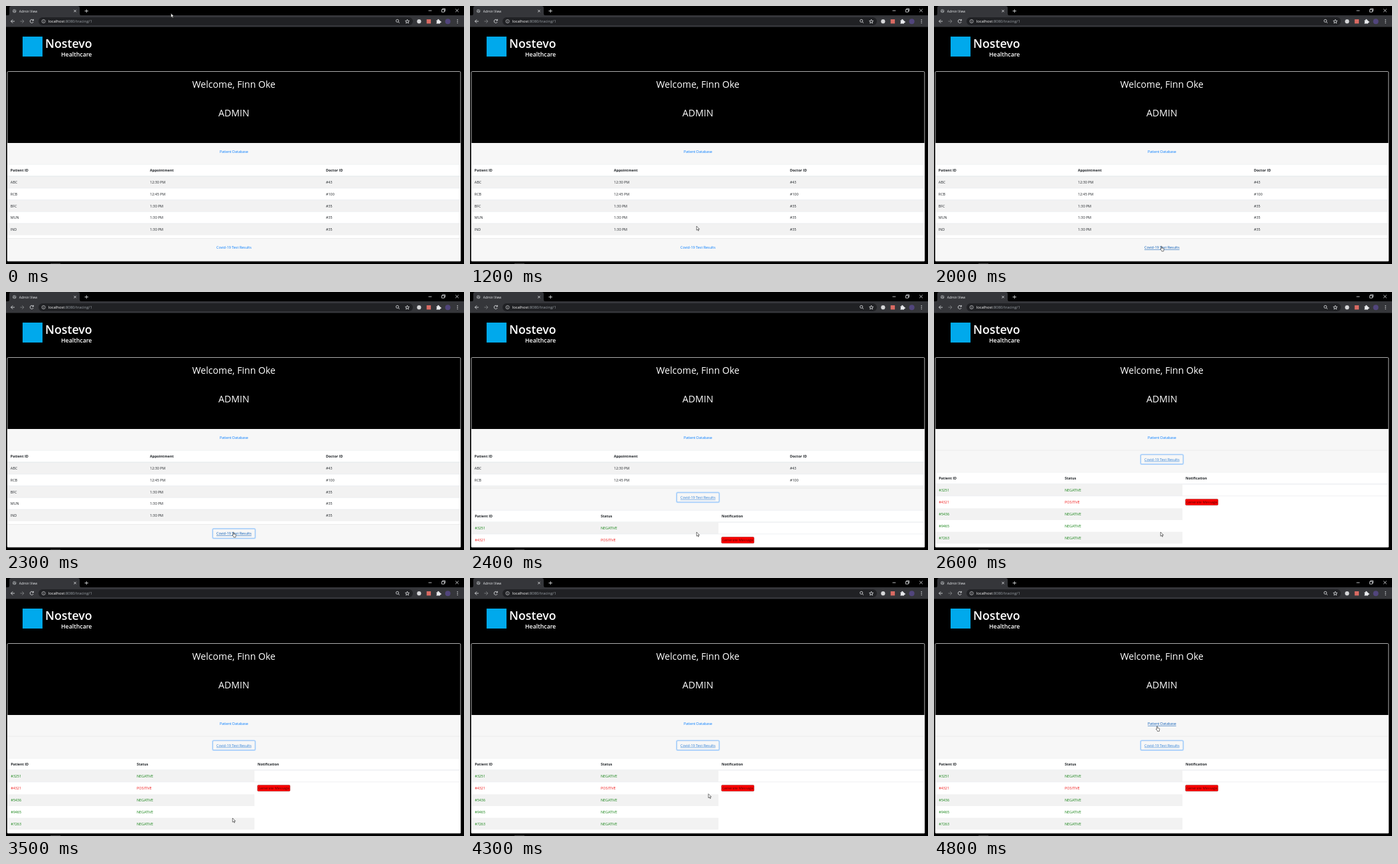
Animation of 690 by 388 pixels, one loop 5000 ms. Source, as an HTML page:

```html
<!DOCTYPE html>
<html lang="en">
<head>
<meta charset="utf-8">
<title>Admin View</title>
<style>
  html, body { margin: 0; width: 100%; height: 100%; overflow: hidden; background: #000; }
  svg { display: block; width: 690px; height: 388px; }
  text { font: 5.4px "Open Sans", "Noto Sans", sans-serif; fill: #212529; white-space: pre; }
  .bold { font-weight: 700; }
  .mid { text-anchor: middle; }
  .title { font-size: 14.1px; fill: #fff; }
  .link { fill: #007bff; }
  .link.on { fill: #0056b3; text-decoration: underline; }
  .link.focus { fill: #2f7fd6; text-decoration: underline; }
  .icon { fill: none; stroke: #e8eaed; stroke-width: .8; }
  .dim { stroke: #85878a; }
</style>
</head>
<body>
<svg viewBox="0 0 690 388" xmlns="http://www.w3.org/2000/svg">
  <defs>
    <clipPath id="cardClip"><rect x="2" y="206" width="683" height="177.7"/></clipPath>
    <clipPath id="foldClip"><rect id="fold" x="2" y="237.8" width="683" height="111.5"/></clipPath>
  </defs>
  <rect width="690" height="388"/>

  <g id="browser">
    <path d="M0 14H3Q5 14 5 11V3Q5 0 8 0H108Q111 0 111 3V11Q111 14 113 14H690V31.5H0Z" fill="#35363a"/>
    <rect x="49" y="17" width="564" height="12" rx="6" fill="#202124"/>
    <circle cx="12.7" cy="7.5" r="2.8" fill="#8b8d91"/>
    <path d="M10.5 6.5L13 7.2L12 9.5M13 5.2L15 7" class="icon" style="stroke:#45474a"/>
    <text x="19.8" y="9.6" style="font-size:5px;fill:#e8eaed">Admin View</text>
    <text x="63.7" y="25.2" style="font-size:5.9px;fill:#fff">localhost<tspan fill="#9aa0a6">:8080/tracing/1</tspan></text>
    <path class="icon" d="M102.3 5.8L105.7 9.2M105.7 5.8L102.3 9.2M118.5 7.5H124M121.2 4.8V10.2
      M636.5 7H641.3M656.5 5.3H660.3V9.1H656.5ZM657.7 5V4H661.5V7.8H660.5M677.2 4.5L681.8 9.1M681.8 4.5L677.2 9.1
      M13 23H7.5M10.2 20.3L7.5 23L10.2 25.7M41 21.4A2.6 2.6 0 1 0 41.2 24M41.4 19.8V22H39.2
      M591.1 23.8L593 25.7M604.6 20.2L605.4 22.2L607.6 22.4L605.9 23.8L606.5 25.9L604.6 24.8L602.7 25.9L603.3 23.8L601.6 22.4L603.8 22.2Z"/>
    <path class="icon dim" d="M21.5 23H27M24.3 20.3L27 23L24.3 25.7"/>
    <circle class="icon" cx="56.6" cy="23" r="2.6" style="stroke-width:.6"/>
    <path class="icon" d="M56.6 22.7V24.5M56.6 21.3V22" style="stroke-width:.6"/>
    <circle class="icon" cx="589.6" cy="22.3" r="2"/>
    <circle cx="622.3" cy="23.2" r="3.1" fill="#d5d6d8"/>
    <rect x="633.7" y="20" width="6.4" height="6.4" fill="#d96a62"/>
    <path d="M648.5 21.5H650.2A1.2 1.2 0 1 1 652.4 21.5H654V23A1.2 1.2 0 1 1 654 25.1V26.5H648.5V25A1.1 1.1 0 0 0 648.5 23Z" fill="#e8eaed"/>
    <circle cx="665.6" cy="23.2" r="4" fill="#51457c"/>
    <g fill="#e8eaed"><circle cx="680.2" cy="20.8" r=".7"/><circle cx="680.2" cy="23.2" r=".7"/><circle cx="680.2" cy="25.6" r=".7"/></g>
  </g>

  <rect x="25" y="46" width="30" height="30" fill="#00a9ec"/>
  <text x="59" y="62.5" style="font-size:17.8px;font-weight:600;fill:#fff">Nostevo</text>
  <text x="83" y="76.3" style="font-size:8.8px;font-weight:600;fill:#fff">Healthcare</text>

  <text class="title mid" x="343.3" y="122.5">Welcome, Finn Oke</text>
  <text class="title mid" x="343.3" y="165.7">ADMIN</text>

  <g clip-path="url(#cardClip)">
    <rect x="2" y="206" width="683" height="178" fill="#fff"/>
    <rect x="2" y="206" width="683" height="32" fill="#f7f7f7"/>
    <text id="patients" class="link mid" x="343.4" y="221.2">Patient Database</text>
    <g id="appointments" clip-path="url(#foldClip)"></g>
    <g id="lower">
      <rect x="2" y="349.3" width="683" height="33" fill="#f7f7f7"/>
      <path d="M2 349.5H685" stroke="#dfdfdf" stroke-width=".5"/>
      <g id="ring" fill="none">
        <rect x="311" y="355.6" width="64.8" height="15.2" rx="1.8" stroke="#bfdeff" stroke-width="1.4"/>
        <rect x="311.6" y="356.2" width="63.6" height="14" rx="1.4" stroke="#72aef0" stroke-width=".6"/>
      </g>
      <text id="results" class="link mid" x="343.4" y="365.2">Covid-19 Test Results</text>
      <g id="tests"></g>
    </g>
  </g>
  <rect x="2" y="98.5" width="682.8" height="285.3" rx="1.5" fill="none" stroke="#d5d5d5" stroke-width=".8"/>
  <path d="M67 387.6H82" stroke="#555" stroke-width=".8"/>

  <g id="cursor" stroke-linejoin="round">
    <path id="arrow" d="M0 0V6.2L1.5 4.9L2.5 7.1L3.5 6.7L2.5 4.5H4.4Z" fill="#fff" stroke="#222" stroke-width=".6"/>
    <path id="hand" d="M.9 .6Q1.5 -.1 2 .6V3L4.3 3.4Q5.2 3.6 5.1 4.6L4.7 6.5V7.8H1.7V7L-.4 4.8Q-.3 3.9 .9 4.6Z" fill="#fff" stroke="#222" stroke-width=".6"/>
  </g>
</svg>
<script>
const $ = id => document.getElementById(id);
const LOOP = 5000, STEP = 100, OPEN = 2400, FOCUS = 2200, FOLD = 111.5;

const cell = (x, y, label, fill = '#212529', cls = '') =>
  `<text x="${x}" y="${y}" class="${cls}" style="fill:${fill}">${label}</text>`;
const band = (y, w, h, fill) => `<rect x="2" y="${y}" width="${w}" height="${h}" fill="${fill}"/>`;
const rule = (x, y, w = .5) => `<path d="M${x} ${y}H685" stroke="#dee2e6" stroke-width="${w}"/>`;
const head = (xs, labels, y) => labels.map((s, i) => cell(xs[i], y, s, '#212529', 'bold')).join('');

function appointments() {
  const xs = [6.8, 216.8, 482], top = 256.2, h = 17.7;
  const rows = ['ABC|12:30 PM|#43', 'RCB|12:45 PM|#100', 'BFC|1:30 PM|#35', 'MUN|1:30 PM|#35', 'IND|1:30 PM|#35'];
  return band(237.8, 683, 112, '#fff') + rule(2, 238.2)
    + head(xs, ['Patient ID', 'Appointment', 'Doctor ID'], 249.2) + rule(2, 256, .8)
    + rows.map((row, i) => {
      const y = top + i * h;
      return band(y, 683, h, i % 2 ? '#fff' : '#f2f2f2') + rule(2, y)
        + row.split('|').map((s, k) => cell(xs[k], y + 11, s)).join('');
    }).join('');
}

function tests() {
  const xs = [7.2, 197, 379], top = 400.6;
  const tops = [0, 17.6, 36.2, 53.9, 71.6, 89.3];
  const ids = [3251, 4321, 5436, 9465, 7263];
  return band(382.3, 683, 120, '#fff') + rule(2, 382.6)
    + head(xs, ['Patient ID', 'Status', 'Notification'], 393.7) + rule(2, 400.4, .8)
    + ids.map((id, i) => {
      const y = top + tops[i], sick = id === 4321, ink = sick ? '#f01818' : '#108010';
      return band(y, 372.3, tops[i + 1] - tops[i], i % 2 ? '#fff' : '#f2f2f2')
        + (i === 1 ? rule(2, y) : '')
        + cell(xs[0], y + 11, '#' + id, ink) + cell(xs[1], y + 11, sick ? 'POSITIVE' : 'NEGATIVE', ink)
        + (sick ? `<rect x="378.9" y="${y + 4.7}" width="49" height="9.2" rx="1.4" fill="#f00" stroke="#8c1010" stroke-width=".5"/>`
          + cell(403.4, y + 11.2, 'Generate Message', '#5a0000', 'mid') : '');
    }).join('');
}

$('appointments').innerHTML = appointments();
$('tests').innerHTML = tests();

// time, x, y of the pointer tip
const path = [[0, 248.5, 11], [400, 318, 125], [500, 318, 125], [1100, 341, 311], [1200, 341.3, 331],
  [1700, 341.3, 361], [3600, 341.3, 361], [3900, 364, 345], [4200, 364, 345], [4800, 334.8, 222.6], [LOOP, 334.8, 222.6]];
// time, height left of the folding table
const folds = [[0, FOLD], [OPEN, 57.2], [2500, 8.2], [2600, 0]];

function pointer(t) {
  const i = path.findIndex(p => p[0] > t), [t0, x0, y0] = path[i - 1], [t1, x1, y1] = path[i];
  const k = (t - t0) / (t1 - t0);
  return [x0 + (x1 - x0) * k, y0 + (y1 - y0) * k];
}

function draw(time) {
  const t = Math.floor((time % LOOP) / STEP) * STEP;
  const [x, y] = pointer(t);
  const height = folds.filter(f => f[0] <= t).pop()[1];
  const overResults = t >= 1700 && t < OPEN, overPatients = t >= 4800;
  const focused = t >= FOCUS, hand = overResults || overPatients;

  $('fold').setAttribute('height', height);
  $('lower').setAttribute('transform', `translate(0 ${height - FOLD})`);
  $('tests').style.display = t >= OPEN ? '' : 'none';
  $('ring').style.display = focused ? '' : 'none';
  $('results').setAttribute('class', 'link mid' + (overResults ? ' on' : focused ? ' focus' : ''));
  $('patients').setAttribute('class', 'link mid' + (overPatients ? ' on' : ''));
  $('cursor').setAttribute('transform', `translate(${x} ${y})`);
  $('arrow').style.display = hand ? 'none' : '';
  $('hand').style.display = hand ? '' : 'none';
}

const start = performance.now();
function tick() {
  draw(performance.now() - start);
  requestAnimationFrame(tick);
}
tick();
</script>
</body>
</html>
```
